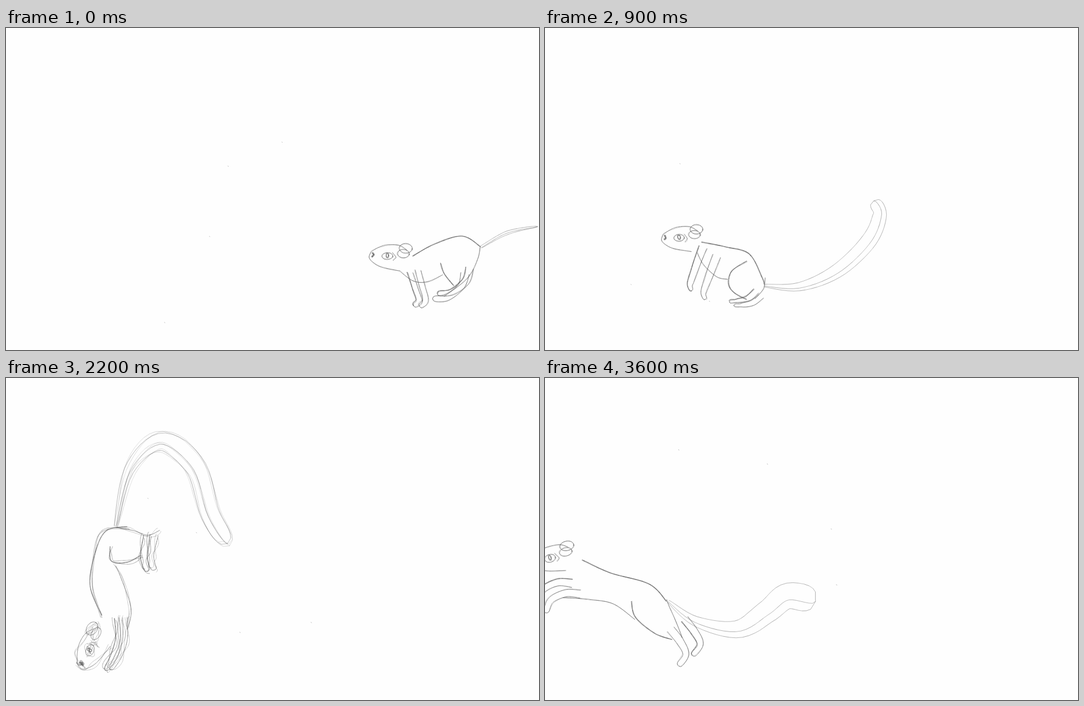
Animation, 900 px wide and 545 px high, one loop 3700 ms. Source, as an HTML page with a canvas:

```html
<!DOCTYPE html>
<html lang="en">
<head>
<meta charset="utf-8">
<title>Squirrel pencil test</title>
<style>
html, body { margin: 0; width: 100%; height: 100%; overflow: hidden; background: #fefefe; }
canvas { display: block; }
</style>
</head>
<body>
<canvas id="stage" width="900" height="545"></canvas>
<script>
const ctx = document.getElementById('stage').getContext('2d');
const STEPS = 36;
const lerp = (a, b, u) => a + (b - a) * u;
const samples = fn => Array.from({ length: STEPS + 1 }, (_, i) => fn(i / STEPS));

// Smooth curve through a flat list of knots.
function curve(knots) {
  const last = knots.length / 2 - 1;
  const at = (i, axis) => knots[2 * Math.max(0, Math.min(last, i)) + axis];
  return samples(t => {
    const p = t * last, i = Math.min(last - 1, Math.floor(p)), u = p - i;
    return [0, 1].map(axis => {
      const [a, b, c, d] = [-1, 0, 1, 2].map(k => at(i + k, axis));
      return b + u * (c - a + u * (2 * a - 5 * b + 4 * c - d + u * (3 * (b - c) + d - a))) / 2;
    });
  });
}

const oval = (x, y, rx, ry) => samples(t => [x + rx * Math.cos(6.6 * t), y + ry * Math.sin(6.6 * t)]);
const moved = (points, dx, dy) => points.map(([x, y]) => [x + dx, y + dy]);

// One side of a limb around its spine; the half-width closes to a round tip.
function edge(spine, side, halfWidth) {
  return spine.map(([x, y], i) => {
    const [ax, ay] = spine[Math.max(0, i - 1)], [bx, by] = spine[Math.min(STEPS, i + 1)];
    const t = i / STEPS, length = Math.hypot(bx - ax, by - ay) || 1;
    const cap = Math.sqrt(Math.max(0, 1 - Math.max(0, (t - 0.88) / 0.12) ** 2));
    const w = side * cap * halfWidth(t) / length;
    return [x - (by - ay) * w, y + (bx - ax) * w];
  });
}

// Head facing left with the nose near the origin.
const headLines = [
  [2, curve([0, -4, 13, -11, 28, -15, 47, -14, 60, -6])],
  [2, curve([0, -4, -4, 6, 3, 15, 18, 23, 47, 29])],
  [2, oval(58, -9, 11, 8)],
  [2, oval(54, 0, 10, 7)],
  [2, oval(27, 4, 9, 6)],
  [3, oval(27, 3, 2, 4)],
  [4, curve([2, -2, 4, 2, 1, 6])],
  [2, curve([36, -2, 41, 6, 37, 12])]
];

function head([x, y, degrees, scale]) {
  const angle = degrees * Math.PI / 180, c = Math.cos(angle) * scale, s = Math.sin(angle) * scale;
  return headLines.map(([weight, points]) => [weight, points.map(([u, v]) => [x + u * c - v * s, y + u * s + v * c])]);
}

function leg(knots, [dx, dy]) {
  const spine = curve(knots), width = t => lerp(7, 4.5, t);
  return [1, -1].flatMap(side => {
    const near = edge(spine, side, width);
    return [[2, near], [side > 0 ? 3 : 2, moved(near, dx, dy)]];
  });
}

function tail(knots, [middle, tip]) {
  const spine = curve(knots);
  const width = t => t < 0.5 ? lerp(2, middle, t * 2) : lerp(middle, tip, t * 2 - 1);
  return [[1, edge(spine, 1, width)], [1, edge(spine, -1, width)], [1, edge(spine, 0.3, width)]];
}

const pose = p => ({
  loose: p.loose || 1,
  lines: [
    ...tail(p.tail, p.fluff),
    [3, curve(p.back)], [2, curve(p.belly)], [3, curve(p.thigh)], [2, curve(p.rump)],
    ...leg(p.hind, p.hindFar), ...leg(p.fore, p.foreFar), ...head(p.head)
  ]
});

const shift = (p, dx, dy) => ({ ...p, lines: p.lines.map(([weight, points]) => [weight, moved(points, dx, dy)]) });

const run = pose({
  head: [617, 382, 0, 1],
  back: [686, 386, 722, 367, 770, 352, 801, 370],
  belly: [664, 411, 688, 428, 712, 429, 738, 418],
  thigh: [734, 398, 740, 416, 756, 436],
  rump: [801, 370, 797, 390, 778, 424, 740, 455],
  hind: [775, 415, 768, 438, 745, 456, 720, 458], hindFar: [8, -9],
  fore: [694, 412, 702, 440, 708, 462, 698, 471], foreFar: [-10, -1],
  tail: [802, 371, 845, 347, 898, 336], fluff: [3, 1]
});

const land = pose({
  head: [251, 427, -43, 1.05],
  back: [296, 385, 325, 380, 360, 338, 390, 321, 416, 327],
  belly: [298, 416, 322, 434, 350, 430, 372, 405],
  thigh: [374, 354, 366, 375, 378, 400, 402, 402, 417, 380],
  rump: [415, 327, 420, 345, 414, 360],
  hind: [420, 372, 422, 392, 428, 406, 434, 402], hindFar: [12, -22],
  fore: [318, 402, 300, 436, 280, 462, 260, 479], foreFar: [22, 2],
  tail: [415, 327, 475, 314, 540, 305, 600, 325, 668, 378], fluff: [23, 30]
});

const erect = pose({
  head: [241, 212, 78, 1.12],
  back: [266, 298, 295, 345, 322, 395, 325, 440],
  belly: [232, 292, 234, 335, 250, 380, 265, 408],
  thigh: [290, 385, 264, 425, 262, 462, 288, 468, 312, 463],
  rump: [325, 415, 326, 435, 316, 451],
  hind: [325, 455, 308, 470, 294, 484, 278, 490], hindFar: [-12, -2],
  fore: [270, 342, 235, 338, 200, 342, 190, 366], foreFar: [-9, -47],
  tail: [326, 452, 370, 490, 440, 476, 520, 455, 588, 494], fluff: [14, 19]
});

const dive = pose({
  loose: 4,
  head: [98, 180, -47, 1.15],
  back: [165, 110, 205, 101, 275, 112, 298, 165, 280, 205],
  belly: [148, 180, 188, 169, 225, 184, 257, 200],
  thigh: [248, 128, 236, 155, 232, 185],
  rump: [288, 145, 298, 172, 262, 218],
  hind: [258, 195, 252, 212, 240, 228, 239, 250], hindFar: [-16, 4],
  fore: [175, 168, 155, 188, 145, 215, 139, 248], foreFar: [-21, 15],
  tail: [288, 200, 320, 248, 372, 295, 388, 335, 343, 423], fluff: [10, 3]
});

const handstand = pose({
  loose: 4,
  head: [124, 485, -62, 1.1],
  back: [162, 402, 142, 350, 152, 290, 170, 258, 205, 252],
  belly: [205, 425, 211, 390, 195, 340, 185, 318],
  thigh: [176, 285, 178, 310, 205, 312, 228, 300],
  rump: [185, 253, 215, 258, 240, 266, 260, 258],
  hind: [250, 265, 244, 300, 250, 325], hindFar: [-11, 2],
  fore: [198, 405, 199, 440, 190, 470, 176, 494], foreFar: [-8, 1],
  tail: [185, 250, 208, 155, 262, 108, 320, 150, 345, 230, 374, 280], fluff: [18, 15]
});

const sit = pose({
  head: [118, 328, 9, 1.05],
  back: [188, 355, 235, 368, 275, 397, 293, 455, 290, 470],
  belly: [178, 368, 185, 390, 205, 418, 222, 432],
  thigh: [265, 408, 230, 425, 222, 455, 250, 486],
  rump: [293, 455, 287, 472, 270, 492],
  hind: [282, 480, 262, 489, 235, 490, 216, 492], hindFar: [-15, -2],
  fore: [216, 380, 204, 415, 199, 442, 210, 453], foreFar: [-38, -20],
  tail: [290, 472, 355, 478, 425, 444, 478, 375, 484, 310, 452, 264], fluff: [12, 27]
});

const leap = pose({
  head: [-20, 308, -14, 1.05],
  back: [62, 308, 110, 330, 175, 348, 205, 378],
  belly: [30, 372, 75, 375, 115, 382, 152, 409],
  thigh: [146, 378, 153, 405, 185, 432, 215, 443],
  rump: [205, 375, 215, 398, 232, 440],
  hind: [212, 425, 228, 446, 238, 468, 225, 487], hindFar: [24, -17],
  fore: [60, 366, 35, 364, 10, 376, 2, 398], foreFar: [-14, -18],
  tail: [208, 378, 255, 412, 325, 425, 375, 395, 410, 369, 457, 378], fluff: [18, 24]
});

// Start time, pose, and extra height in the middle of the move that follows.
const keys = [
  [0, run, 0], [300, shift(leap, 425, 8), 0], [600, land, 0], [1000, shift(sit, 65, 0), 0],
  [1400, erect, 45], [1800, dive, 0], [2200, handstand, 0], [2800, sit, 0],
  [3200, shift(sit, -12, 4), 0], [3600, leap, 0]
];
const held = [1100, 1300, 2500, 2700, 3300, 3500];

function random(seed) {
  return () => {
    seed = seed + 0x6d2b79f5 | 0;
    let n = Math.imul(seed ^ seed >>> 15, seed | 1);
    n ^= n + Math.imul(n ^ n >>> 7, n | 61);
    return ((n ^ n >>> 14) >>> 0) / 4294967296;
  };
}

function pencil(weight, points, loose, rnd) {
  const width = [0, 0.8, 1, 1.4, 2.6][weight], alpha = [0, 0.55, 0.65, 0.7, 0.75][weight];
  const passes = loose > 2 ? 3 : Math.min(weight, 2);
  for (let pass = 0; pass < passes; pass++) {
    const phase = rnd() * 6.28, spread = pass ? loose : 0.3;
    const wobble = points.map(([x, y], i) =>
      [x + spread * Math.sin(i * 0.21 + phase), y + spread * Math.cos(i * 0.17 + phase)]);
    ctx.lineWidth = pass ? width * 0.8 : width;
    for (let i = 1; i < points.length; i++) {
      ctx.globalAlpha = alpha * (pass ? 0.55 : 1) * (0.7 + 0.3 * rnd());
      ctx.beginPath();
      ctx.moveTo(...wobble[i - 1]);
      ctx.lineTo(...wobble[i]);
      ctx.stroke();
    }
  }
}

function draw(time) {
  const rnd = random(time + 1);
  const k = keys.findLastIndex(key => key[0] <= time);
  const [start, from, height] = keys[k], [end, to] = keys[k + 1] || [start + 1, from];
  const u = (time - start) / (end - start), lift = height * Math.sin(Math.PI * u);
  ctx.globalAlpha = 1;
  ctx.fillStyle = '#fefefe';
  ctx.fillRect(0, 0, 900, 545);
  ctx.strokeStyle = '#444';
  from.lines.forEach(([weight, points], n) => {
    const target = to.lines[n][1];
    const mixed = points.map(([x, y], i) => [lerp(x, target[i][0], u), lerp(y, target[i][1], u) - lift]);
    pencil(weight, mixed, lerp(from.loose, to.loose, u), rnd);
  });
  for (let i = 0; i < 4; i++) {
    const x = 120 + rnd() * 430, y = 100 + rnd() * 400;
    pencil(1, [[x, y], [x + 1.5, y + 1]], 1, rnd);
  }
}

let shown = -1;
function tick() {
  let time = Math.floor(performance.now() % 3700 / 100) * 100;
  if (held.includes(time)) time -= 100;
  if (time !== shown) draw(shown = time);
  requestAnimationFrame(tick);
}
tick();
</script>
</body>
</html>
```
